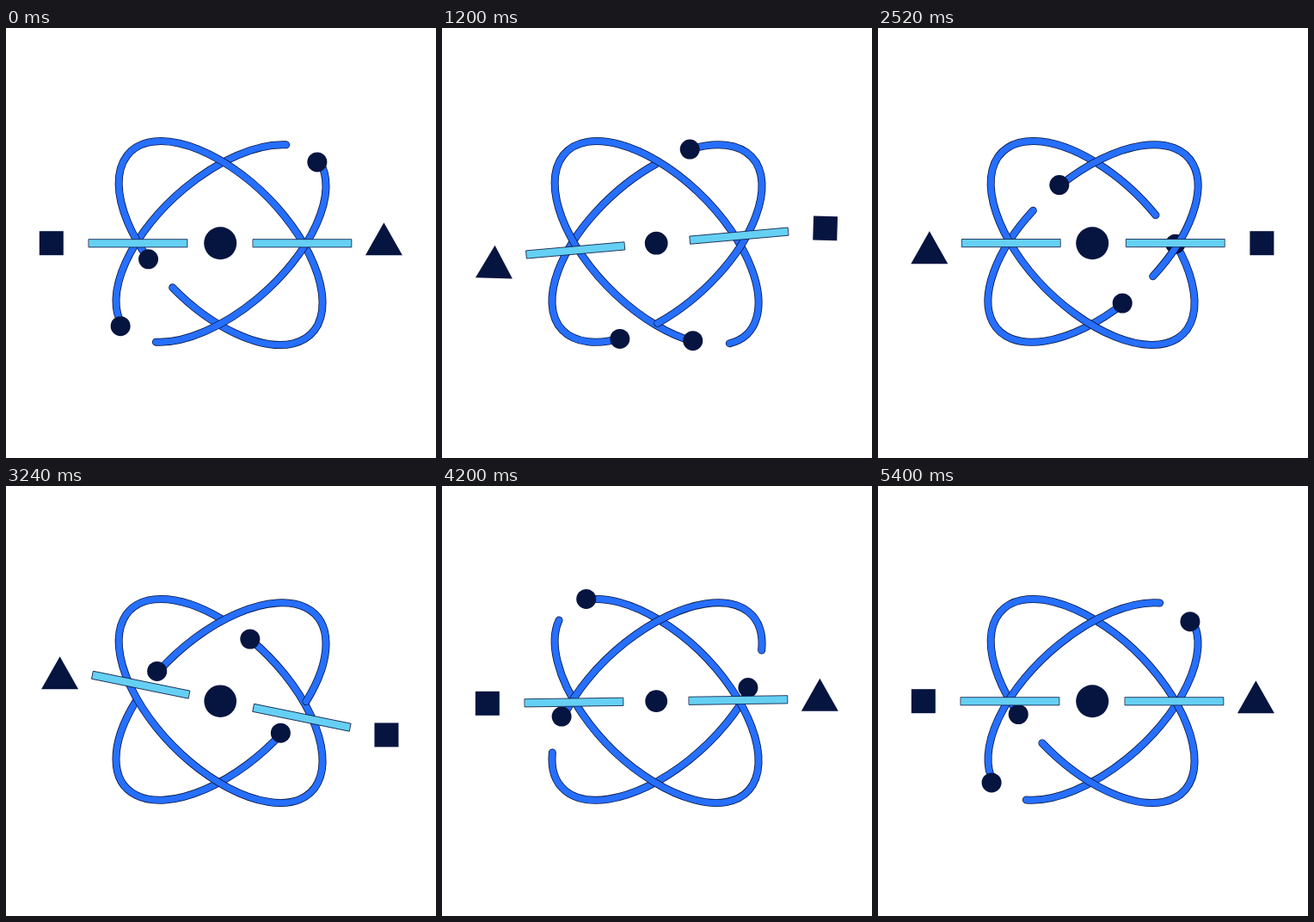
Recreate the animation shown at these times as an HTML page with a canvas. Size 500 px wide and 500 px high, loop 5.43 s.

```html
<!DOCTYPE html>
<html lang="en">
<head>
<meta charset="utf-8">
<title>Atom</title>
<style>
  html, body { margin: 0; width: 100%; height: 100%; overflow: hidden; background: #fff; }
  canvas { display: block; width: 500px; height: 500px; }
</style>
</head>
<body>
<canvas id="stage" width="500" height="500"></canvas>
<script>
const ctx = document.getElementById('stage').getContext('2d');
const LOOP = 5430, CYCLE = 2867, SPIN = 1485;
const NAVY = '#061440', BLUE = '#266fff', CYAN = '#65d0f3';
const RX = 149.2, RY = 76.2, RAD = Math.PI / 180;
// dx, dy: how far the electrons run beside the line of their orbit.
const ORBIT_A = { x: 249.6, y: 250, tilt: 45 * RAD, dx: -1, dy: -1 };
const ORBIT_B = { x: 250, y: 250.5, tilt: -42 * RAD, dx: -2.5, dy: 0.8 };

// Arc length of the ellipse at every whole degree, for even speed along it.
const lengths = [0];
for (let i = 0; i <= 360; i++) {
  const a = (i + 0.5) * RAD;
  lengths.push(lengths[i] + RAD * Math.hypot(RX * Math.sin(a), RY * Math.cos(a)));
}
const PERIM = lengths[360];

function toLength(deg) {
  const i = Math.floor(deg);
  return lengths[i] + (lengths[i + 1] - lengths[i]) * (deg - i);
}

function toAngle(s) {
  const turns = Math.floor(s / PERIM);
  s -= turns * PERIM;
  let i = 0;
  while (i < 359 && lengths[i + 1] < s) i++;
  return (turns * 360 + i + (s - lengths[i]) / (lengths[i + 1] - lengths[i])) * RAD;
}

function ease(t, from, to) {
  const k = Math.min(1, Math.max(0, (t - from) / (to - from)));
  return k < 0.5 ? 4 * k ** 3 : 1 - 4 * (1 - k) ** 3;
}

function disc(x, y, r) {
  ctx.fillStyle = NAVY;
  ctx.beginPath();
  ctx.arc(x, y, r, 0, 2 * Math.PI);
  ctx.fill();
}

// A trail from head to tail (lengths along the orbit) with its electron.
function electron(orbit, head, tail) {
  const a = toAngle(head);
  ctx.lineCap = 'round';
  ctx.beginPath();
  ctx.ellipse(orbit.x, orbit.y, RX, RY, orbit.tilt, a, toAngle(tail));
  for (const [color, width] of [[NAVY, 9], [BLUE, 7.4]]) {
    ctx.strokeStyle = color;
    ctx.lineWidth = width;
    ctx.stroke();
  }
  const u = RX * Math.cos(a), v = RY * Math.sin(a);
  const c = Math.cos(orbit.tilt), s = Math.sin(orbit.tilt);
  disc(orbit.x + orbit.dx + u * c - v * s, orbit.y + orbit.dy + u * s + v * c, 11.5);
}

const HALF = PERIM / 2;
const headA = toLength(107.5), headB = toLength(4.3), tailB = toLength(153);

function electrons(p) {
  const a = headA - p * PERIM;
  const b = headB - p * HALF, tail = tailB - p * HALF;
  electron(ORBIT_B, b + HALF, tail + HALF);
  electron(ORBIT_A, a, a + PERIM - 42);
  electron(ORBIT_B, b, tail);
}

function shapeAt(x, y, turn, points) {
  ctx.save();
  ctx.translate(x, y);
  ctx.rotate(turn);
  ctx.fillStyle = NAVY;
  ctx.beginPath();
  for (const [px, py] of points) ctx.lineTo(px, py);
  ctx.fill();
  ctx.restore();
}

const SQUARE = [[-14, -14], [14, -14], [14, 14], [-14, 14]];
const TRIANGLE = [[0, -19], [21.5, 19], [-21.5, 19]];

function arms(t, second) {
  const turn = Math.PI * (second + ease(t, 0, SPIN));
  // In the first half the shapes straighten up slightly late.
  const lag = second ? 0 : 28;
  const upright = -Math.PI * (second + ease(t - lag, 0, SPIN));
  const size = 1 - ease(t, 1470, 1740) + ease(t, 1950, 2520);

  ctx.save();
  ctx.translate(249.6, 250.2);
  ctx.rotate(turn);
  shapeAt(-196.8, 0, upright, SQUARE);
  shapeAt(189.8, -5, upright, TRIANGLE);
  const w = 114.5 * size;
  if (w > 0.5) {
    ctx.fillStyle = CYAN;
    ctx.strokeStyle = NAVY;
    ctx.lineWidth = 0.8;
    for (const x of [-96, 95]) {
      ctx.beginPath();
      ctx.rect(x - w / 2, -4.5, w, 9.2);
      ctx.fill();
      ctx.stroke();
    }
  }
  ctx.restore();
}

function draw(time) {
  const second = time >= CYCLE ? 1 : 0;
  const t = time - second * CYCLE;
  ctx.clearRect(0, 0, 500, 500);
  electrons(time / LOOP);
  arms(t, second);
  disc(249.2, 250.2, 19 - 6.5 * (ease(t, 50, 1750) - ease(t, 1750, 2550)));
}

const start = performance.now();
function frame() {
  draw((performance.now() - start) % LOOP);
  requestAnimationFrame(frame);
}
frame();
</script>
</body>
</html>
```
